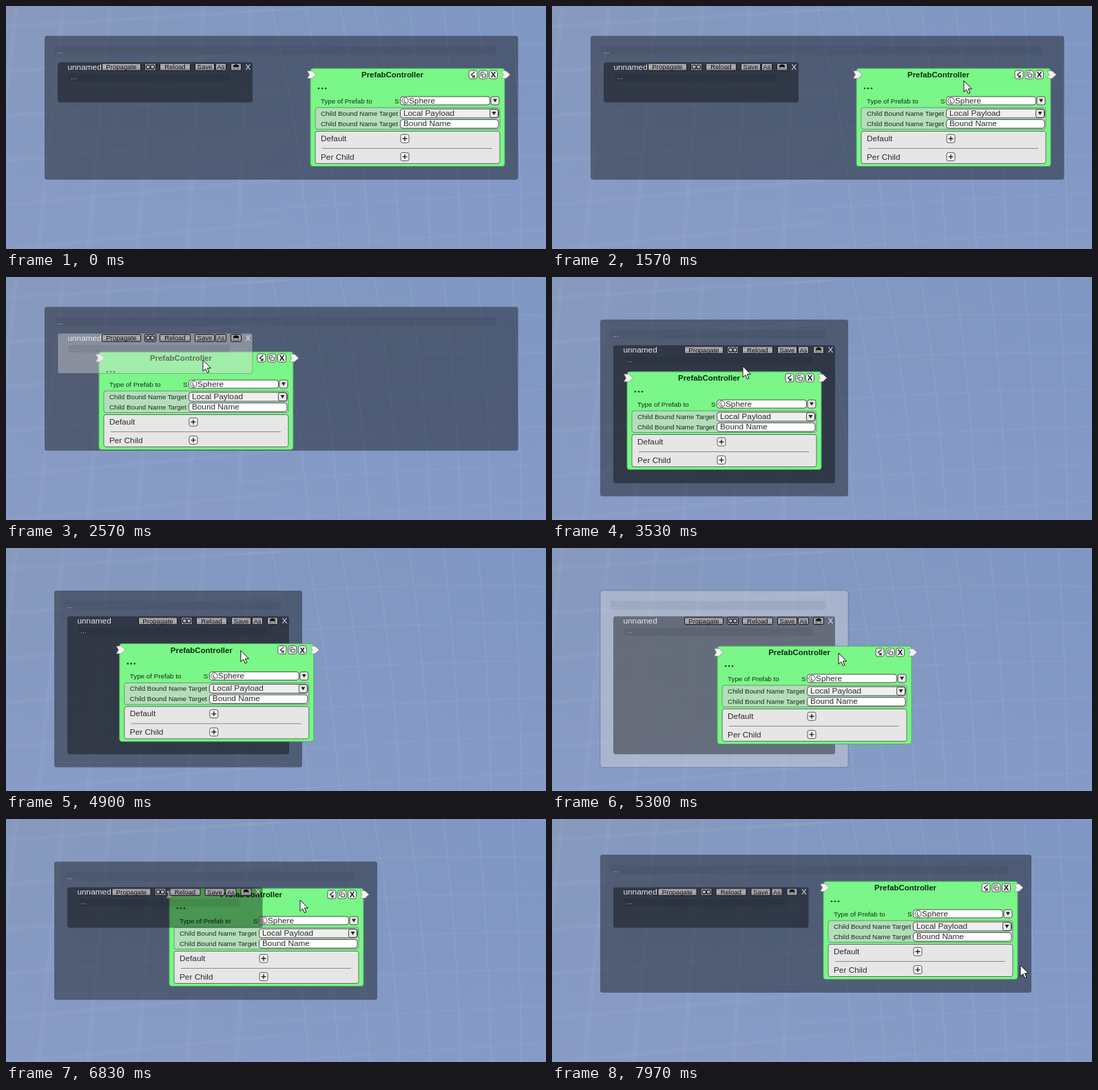
These frames come from a looping animation (784x354 px, 8 s). An HTML page:

```html
<!DOCTYPE html>
<html>
<head>
<meta charset="utf-8">
<title>Node editor</title>
<style>
html, body { margin: 0; width: 100%; height: 100%; overflow: hidden; background: #8398c0; }
svg { display: block; width: 784px; height: 354px; }
text { font-family: "Liberation Sans", Arial, sans-serif; font-size: 11.8px; fill: #2c2c2c; }
text.s { font-size: 9.8px; fill: #1c2c1e; }
text.b { font-weight: bold; font-size: 11.4px; fill: #0b2a0f; }
text.w { fill: #e4e6ea; }
.m { text-anchor: middle; }
</style>
</head>
<body>
<svg viewBox="0 0 784 354" id="stage">
  <defs>
    <linearGradient id="sky" x1="0" y1="0" x2="1" y2=".45">
      <stop offset="0" stop-color="#8799bd"/>
      <stop offset=".5" stop-color="#8198c1"/>
      <stop offset="1" stop-color="#7e96c3"/>
    </linearGradient>
    <linearGradient id="haze" x1="0" y1="0" x2="0" y2="1">
      <stop offset="0" stop-color="#8a9cc8" stop-opacity="0"/>
      <stop offset="1" stop-color="#8f9fca" stop-opacity=".5"/>
    </linearGradient>
    <linearGradient id="metal" x1="0" y1="0" x2="0" y2="1">
      <stop offset="0" stop-color="#8b8b8f"/>
      <stop offset=".5" stop-color="#b2b2b5"/>
      <stop offset="1" stop-color="#85858a"/>
    </linearGradient>
  </defs>
  <rect width="784" height="354" fill="url(#sky)"/>
  <rect width="784" height="354" fill="url(#haze)"/>
  <g id="grid" fill="none" stroke="#b4c6e2"></g>
  <g id="outer"></g>
  <g id="node"></g>
  <g id="inner"></g>
  <path id="cursor" d="M0 0V16.2L3.8 12.7L6.4 18.6L9 17.5L6.4 11.8H11.6Z" fill="#fff" stroke="#111" stroke-width="1"/>
</svg>
<script>
const $ = id => document.getElementById(id);
const LOOP = 8000;
const DRAG1 = 2000, DROP1 = 3000, DRAG2 = 4530, DROP2 = 6480, DRAG3 = 7030, DROP3 = 7720;

const rect = (x, y, w, h, fill, stroke = 'none', r = 3) =>
  `<rect x="${x}" y="${y}" width="${w}" height="${h}" rx="${r}" fill="${fill}" stroke="${stroke}"/>`;
const text = (x, y, s, cls = '', more = '') => `<text x="${x}" y="${y}" class="${cls}" ${more}>${s}</text>`;
const path = (d, fill, stroke = 'none', w = 1) =>
  `<path d="${d}" fill="${fill}" stroke="${stroke}" stroke-width="${w}"/>`;
const dots = (x, y, gap, r, fill) =>
  [0, 1, 2].map(i => `<circle cx="${x + i * gap}" cy="${y}" r="${r}" fill="${fill}"/>`).join('');

function gridLines() {
  let s = '';
  for (let i = 0; i < 9; i++)
    s += `<path d="M${385 + 50 * i} 0Q${425 + 46 * i} 170 ${440 + 44 * i} 354" stroke-width="2" opacity=".13"/>`;
  for (let i = 0; i < 7; i++)
    s += `<path d="M330 ${10 + 58 * i}Q560 ${-8 + 58 * i} 784 ${2 + 54 * i}" stroke-width="2" opacity=".1"/>`;
  for (let i = 0; i < 6; i++)
    s += `<path d="M${15 + 68 * i} 0L${-25 + 72 * i} 354" stroke-width="7" opacity=".07"/>` +
      `<path d="M0 ${30 + 65 * i}L400 ${5 + 62 * i}" stroke-width="5" opacity=".07"/>`;
  return s;
}

function nodeArt() {
  const edge = '#4c4c4c';
  const plug = x => path(`M${x} 3.5H${x + 7}L${x + 13} 9L${x + 7} 14.5H${x}L${x + 3} 9Z`, '#f2f2f2', '#858585', .7);
  const icon = x => rect(x - 6, 3, 12, 12, '#f4f4f4', '#4a5a4c', 2.5);
  const drop = (x, y) => rect(x, y, 12, 12, '#e8e8e8', edge, 2.5) +
    path(`M${x + 3} ${y + 3.6}H${x + 9}L${x + 6} ${y + 8.4}Z`, '#222');
  const plus = y => rect(131, y - 6, 12, 12, '#f6f6f6', '#555', 2.5) +
    path(`M133.5 ${y}H140.5M137 ${y - 3.5}V${y + 3.5}`, 'none', '#222', 1.4);
  return rect(0, 0, 282, 142.5, '#7af788', '#4fae5c', 3.5) +
    plug(-4.5) + plug(277) +
    text(119, 13.4, 'PrefabController', 'b m') +
    icon(236) + icon(251) + icon(265.5) +
    path('M238.5 5L233.5 9L238 12.5M238 9.6V12.6H235', 'none', '#222', 1.2) +
    path('M247.5 5.5H252.5M247.5 5.5V11.5M249.5 8H254.5V12.5H249.5Z', 'none', '#444', 1) +
    text(265.5, 13.2, 'X', 'b m', 'style="fill:#111"') +
    dots(12, 29, 5, 1.3, '#1d4523') +
    text(15, 51, 'Type of Prefab to', 's') + text(122, 51, 'S', 's') +
    rect(130.5, 41, 130, 12, '#fff', edge, 3.5) +
    '<circle cx="137.5" cy="47" r="4.6" fill="none" stroke="#333" stroke-width=".9"/>' +
    path('M136.2 44.5V49.3H139.2', 'none', '#333', .9) +
    text(143, 51, 'Sphere') + drop(262, 41) +
    rect(7, 57, 268, 31.5, '#b3deb9', '#699872') +
    text(15, 69, 'Child Bound Name Target', 's') +
    rect(130.5, 59, 143, 13, '#efefef', edge, 3.5) + text(135, 69, 'Local Payload') + drop(260.5, 59.5) +
    text(15, 84, 'Child Bound Name Target', 's') +
    rect(130.5, 74.5, 142.5, 12.5, '#fff', edge, 3.5) + text(135, 84, 'Bound Name') +
    rect(7, 91.5, 268, 47, '#e6e6e6', '#5c705e') +
    text(15, 106, 'Default') + plus(102.2) +
    path('M17 116.5H264', 'none', '#8c8c8c') +
    text(15, 132.5, 'Per Child') + plus(128.6);
}

const tint = lit => lit ? 'rgba(220,220,220,.4)' : 'rgba(0,0,0,.4)';

function panel(w, h, lit) {
  return rect(0, 0, w, h, tint(lit), lit ? 'rgba(40,50,70,.3)' : 'none', 3.5);
}

function outerArt({ w, h }, lit) {
  return panel(w, h, lit) + rect(15, 15, w - 48, 13, 'rgba(0,0,0,.06)') + dots(19.5, 25, 3, .7, '#b6bfd0');
}

function innerArt({ w, h }, lit) {
  const button = (x, bw, label) => rect(w + x + .5, 1.5, bw - 1, 10.5, 'url(#metal)', '#17191f', 1) +
    (label ? text(w + x + bw / 2, 10.3, label, 'm', 'style="font-size:9.6px;fill:#0c0c0c"') : '');
  const loop = w - 148.5, lamp = w - 24;
  return panel(w, h, lit) +
    rect(16, 17, w - 49, 11, 'rgba(0,0,0,.08)') + dots(20.5, 24, 3, .7, '#9aa0ac') +
    text(14.5, 10.6, 'unnamed', 'w') +
    button(-219, 57, 'Propagate') + button(-157, 17) + button(-135, 45, 'Reload') +
    button(-84, 29, 'Save') + button(-54, 16, 'As') + button(-32, 16) +
    [-3.2, 3.2].map(d => `<circle cx="${loop + d}" cy="6.7" r="3" fill="none" stroke="#111" stroke-width="1.1"/>`).join('') +
    path(`M${lamp - 4.5} 7A4.5 4 0 0 1 ${lamp + 4.5} 7Z`, '#111') +
    path(`M${lamp - 4} 8.5H${lamp + 4}L${lamp + 2} 10.5H${lamp - 2}Z`, '#ddd', '#222', .6) +
    text(w - 6.5, 10.6, 'X', 'w m');
}

// Layouts after each drop: outer and inner panel
const box = (x, y, w, h) => ({ x, y, w, h });
const layouts = [
  [0, box(56, 43.5, 687.5, 209.5), box(75, 82, 283, 58.5)],
  [DROP1, box(70, 62, 360, 257.5), box(89, 99.5, 322, 201)],
  [DROP2, box(70, 62, 469, 201.5), box(89, 99.5, 283.5, 59)],
  [DROP3, box(70, 52, 626, 201), box(89, 99.5, 283.5, 59)]
];

// Pointer path: time, x, y
const keys = [
  [1000, 790, 172], [1200, 700, 135], [1570, 598, 109], [1730, 593, 103],
  [2000, 593, 103], [2300, 400, 116], [2570, 286, 121], [2800, 278, 122],
  [2830, 278, 122], [DROP1, 257, 130], [3530, 277, 130], [3670, 277, 130],
  [4050, 332, 180], [4470, 285, 148], [DRAG2, 285, 148], [5000, 360, 150],
  [5300, 416, 153], [5370, 419, 155], [5650, 430, 175], [6130, 418, 122],
  [6200, 417, 119], [DROP2, 413, 111], [6830, 427, 118], [DRAG3, 427, 118],
  [7400, 577, 116], [7570, 577, 116], [DROP3, 584, 108], [7970, 680, 213], [LOOP, 680, 213]
];

function slope(i, c) {
  const a = keys[i - 1], k = keys[i], b = keys[i + 1];
  if (!a || !b) return 0;
  const l = (k[c] - a[c]) / (k[0] - a[0]), r = (b[c] - k[c]) / (b[0] - k[0]);
  return l * r <= 0 ? 0 : 2 * l * r / (l + r);
}

function pointer(t) {
  if (t <= keys[0][0]) return keys[0].slice(1);
  const i = Math.max(0, keys.findIndex(k => k[0] >= t) - 1);
  const a = keys[i], b = keys[i + 1], d = b[0] - a[0], u = (t - a[0]) / d;
  const e = u * u * (3 - 2 * u);
  return [1, 2].map(c => a[c] + (b[c] - a[c]) * e +
    d * u * (1 - u) * ((1 - u) * slope(i, c) - u * slope(i + 1, c)));
}

function nodeAt(t, [x, y]) {
  if (t < DRAG1) return [442, 91];
  if (t < DROP1) return [x - 151, y - 12];
  if (t < DRAG2) return [109, 138];
  if (t < DROP2) return [x - 176, y - 10];
  if (t < DRAG3) return [237, 101];
  if (t < DROP3) return [x - 190, y - 17];
  return [394, 91];
}

const stage = $('stage'), outer = $('outer'), inner = $('inner'), node = $('node'), cursor = $('cursor');
const move = (el, x, y) => el.setAttribute('transform', `translate(${x.toFixed(2)} ${y.toFixed(2)})`);
let shown = '';

function draw(t) {
  const p = pointer(t);
  const at = layouts.filter(l => l[0] <= t).length - 1;
  const [, o, n] = layouts[at];
  const litInner = t >= DRAG1 && t < DROP1 && p[0] < n.x + n.w;
  const litOuter = t >= DRAG2 && t < DROP2 && p[0] > n.x + n.w;
  const key = [at, litInner, litOuter].join();
  if (key !== shown) {
    shown = key;
    outer.innerHTML = outerArt(o, litOuter);
    inner.innerHTML = innerArt(n, litInner);
    move(outer, o.x, o.y);
    move(inner, n.x, n.y);
    stage.insertBefore(node, at === 1 ? cursor : inner);
  }
  move(node, ...nodeAt(t, p));
  move(cursor, ...p);
  cursor.style.display = t < 1000 ? 'none' : '';
}

$('grid').innerHTML = gridLines();
node.innerHTML = nodeArt();
const start = performance.now();
function tick() {
  draw((performance.now() - start) % LOOP);
  requestAnimationFrame(tick);
}
tick();
</script>
</body>
</html>
```
